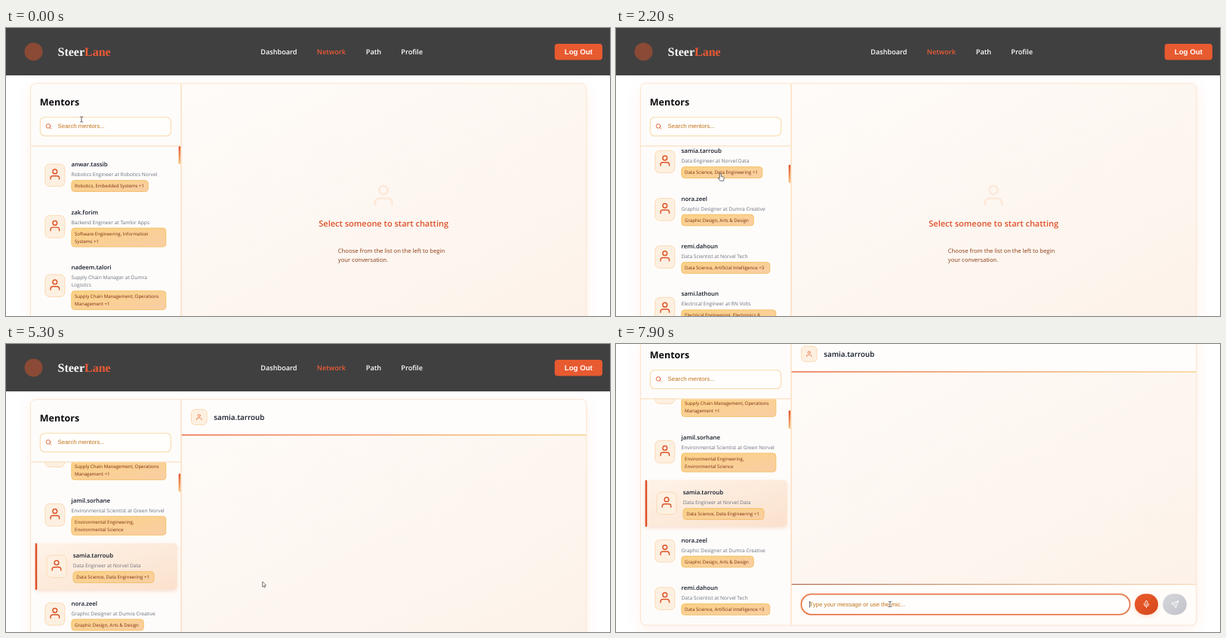
An HTML page for the animation above (8 s loop, 800 px wide and 383 px high).

```html
<!DOCTYPE html>
<html lang="en">
<head>
<meta charset="utf-8">
<title>Mentor chat</title>
<style>
html, body { margin: 0; width: 100%; height: 100%; overflow: hidden; background: #fff; }
svg { display: block; width: 100vw; height: 100vh; }
text { font-family: "Open Sans", "Noto Sans", sans-serif; text-rendering: geometricPrecision; white-space: pre; }
.nav { font-size: 9.15px; font-weight: 600; fill: #fff; }
.brand { font: bold 16px "Liberation Serif", serif; fill: #fff; }
.button { font: bold 9.65px "Liberation Sans", sans-serif; fill: #fff; }
.field { font: 7.88px "Liberation Sans", sans-serif; fill: #c0741c; }
.heading { font-size: 12.5px; font-weight: 700; fill: #0b0b0f; }
.name { font-size: 7.8px; font-weight: 600; fill: #111827; }
.role { font-size: 6.65px; fill: #6b7280; }
.tag { font-size: 6.12px; font-weight: 500; fill: #7c2d12; }
.prompt { font-size: 11px; font-weight: 600; fill: #de5028; }
.hint { font-size: 7.65px; font-weight: 500; fill: #8a3a14; }
.peer { font-size: 9.8px; font-weight: 600; fill: #111827; }
.line { fill: none; stroke-linecap: round; stroke-linejoin: round; }
</style>
</head>
<body>
<svg id="stage" viewBox="0 0 800 383" preserveAspectRatio="none"></svg>
<script>
const LOOP = 8000, OPEN_CHAT = 4650, FOCUS = 6600, PAGE_SCROLL = 84;
const EXTRA_LINE = 10.1, ROW_HEIGHT = 61.6, ROW_PITCH = 63.4;
const ACTIVE = 4;

// name, role lines, tag lines, tag width
const mentors = [
  ["anwar.tassib", ["Robotics Engineer at Robotics Norvel"], ["Robotics, Embedded Systems +1"], 101.5],
  ["zak.forim", ["Backend Engineer at Tamlor Apps"], ["Software Engineering, Information", "Systems +1"], 125],
  ["nadeem.talori", ["Supply Chain Manager at Dumra", "Logistics"], ["Supply Chain Management, Operations", "Management +1"], 125],
  ["jamil.sorhane", ["Environmental Scientist at Green Norvel"], ["Environmental Engineering,", "Environmental Science"], 125],
  ["samia.tarroub", ["Data Engineer at Norvel Data"], ["Data Science, Data Engineering +1"], 107],
  ["nora.zeel", ["Graphic Designer at Dumra Creative"], ["Graphic Design, Arts & Design"], 95.5],
  ["remi.dahoun", ["Data Scientist at Norvel Tech"], ["Data Science, Artificial Intelligence +3"], 117],
  ["sami.lathoun", ["Electrical Engineer at RN Volts"], ["Electrical Engineering, Electronics &", "Communications +1"], 125]
];

const text = (cls, x, y, value, attrs = "") =>
  `<text class="${cls}" x="${x}" y="${y}" ${attrs}>${value.replace(/&/g, "&amp;")}</text>`;

const box = (x, y, w, h, r, fill, stroke = "none", width = 1) =>
  `<rect x="${x}" y="${y}" width="${w}" height="${h}" rx="${r}" fill="${fill}" stroke="${stroke}" stroke-width="${width}"/>`;

const gradient = (id, from, to, dir = 'x2="1" y2="1"') =>
  `<linearGradient id="${id}" x1="0" y1="0" ${dir}><stop stop-color="${from}"/><stop offset="1" stop-color="${to}"/></linearGradient>`;

const person = (x, y, scale, color) =>
  `<g class="line" transform="translate(${x} ${y}) scale(${scale}) translate(-12 -12)" stroke="${color}" stroke-width="2">
    <circle cx="12" cy="7" r="4"/><path d="M20 21v-2a4 4 0 0 0-4-4H8a4 4 0 0 0-4 4v2"/></g>`;

function mentorRow([name, roles, tags, tagWidth], y, index) {
  const extra = (roles.length + tags.length - 2) * EXTRA_LINE;
  const height = ROW_HEIGHT + extra, middle = height / 2 - 16.5;
  const tagTop = 21.2 + (roles.length - 1) * EXTRA_LINE;
  const highlight = index === ACTIVE
    ? `<g id="highlight"><g filter="url(#rowShadow)">${box(38.7, -16.5, 188, height + .4, 5, "url(#activeRow)")}</g>
       ${box(38.7, -16.5, 2.5, height + .4, 1, "#dd5028")}</g>` : "";
  return `<g transform="translate(0 ${y})">${highlight}<g ${index === ACTIVE ? 'id="activeText"' : ""}>
    ${box(51.8, middle - 14.8, 26, 29.6, 6, "#fdf0e1", "#fbd9b5")}
    ${person(64.8, middle - 1.3, .72, "#de5328")}
    ${text("name", 86.5, 2.6, name)}
    ${roles.map((line, i) => text("role", 86.5, 15.8 + i * EXTRA_LINE, line)).join("")}
    ${box(86.8, tagTop, tagWidth, 14.8 + (tags.length - 1) * EXTRA_LINE, 4, "url(#tagFill)", "#f4bf62", .9)}
    ${tags.map((line, i) => text("tag", 91, tagTop + 9.6 + i * EXTRA_LINE, line)).join("")}
  </g></g>`;
}

function mentorList() {
  let y = 181.5;
  return mentors.map((mentor, i) => {
    const row = mentorRow(mentor, y, i);
    y += ROW_PITCH + (mentor[1].length + mentor[2].length - 2) * EXTRA_LINE;
    return row;
  }).join("");
}

const header = `
  <rect width="800" height="63" fill="#404041"/>
  <circle cx="36.5" cy="31.5" r="12" fill="#8a4a35"/>
  <text class="brand" x="68.5" y="36.7">Steer<tspan fill="#ee5a34">Lane</tspan></text>
  ${text("nav", 337.3, 35.2, "Dashboard")}
  ${text("nav", 411.8, 35.2, "Network", 'style="fill:#ee5a34"')}
  ${text("nav", 476.8, 35.2, "Path")}
  ${text("nav", 523.3, 35.2, "Profile")}
  ${box(726.7, 21, 63.2, 21.5, 4, "#e85a30")}
  ${text("button", 758.3, 34.8, "Log Out", 'text-anchor="middle"')}`;

const sidebar = `
  <rect x="33" y="74" width="198.5" height="384" fill="#fefcfa"/>
  <g clip-path="url(#listClip)"><g id="list">${mentorList()}</g>
    <rect id="thumb" x="228.6" width="3" height="24" rx="1" fill="url(#thumbFill)"/></g>
  <rect x="33" y="156.3" width="198.5" height="1.2" fill="#fbdfbd"/>
  <rect x="231.3" y="74" width="1.4" height="384" fill="#fbdcbc"/>
  ${text("heading", 44.8, 103, "Mentors")}
  ${box(45.3, 118.7, 173.2, 24.8, 6, "#fffefd", "#f8daa8", 1.1)}
  <g class="line" stroke="#df5a2c" stroke-width=".9"><circle cx="56" cy="130.4" r="2.8"/><path d="M58.1 132.5l1.7 1.7"/></g>
  ${text("field", 68.6, 133.3, "Search mentors...")}`;

const emptyPane = `<g id="emptyPane">
  ${person(500, 222.5, 1.4, "#fde9da")}
  ${text("prompt", 500.2, 263.9, "Select someone to start chatting", 'text-anchor="middle"')}
  ${text("hint", 439.8, 298.7, "Choose from the list on the left to begin")}
  ${text("hint", 439.8, 311.4, "your conversation.")}</g>`;

const chatPane = `<g id="chatPane">
  <rect x="232.7" y="74" width="536" height="47" fill="#fffdfb"/>
  <rect x="232.7" y="120.3" width="536" height="1.4" fill="url(#headLine)"/>
  ${box(245.5, 87, 20.5, 20.4, 5, "#fdf0e1", "#fbd9b5")}
  ${person(255.7, 97.2, .4, "#e8703f")}
  ${text("peer", 275.3, 101.2, mentors[ACTIVE][0])}
  <rect x="232.7" y="404" width="536" height="54" fill="#fffcf9"/>
  <rect x="232.7" y="403.1" width="536" height="1.1" fill="url(#footLine)"/>
  <rect id="glow" x="243.6" y="414.9" width="438.8" height="30.6" rx="15.3" fill="#f9d9c8"/>
  <rect id="input" x="245.5" y="416.8" width="435" height="26.8" rx="13.4" fill="#fffefc"/>
  ${text("field", 256.3, 432.8, "Type your message or use the mic...")}
  <rect id="caret" x="256.3" y="426" width=".8" height="8.5" fill="#333"/>
  <g filter="url(#rowShadow)">${box(687, 416.2, 31, 28, 14, "url(#micFill)")}</g>
  ${box(724.2, 416.2, 31.6, 28, 14, "url(#sendFill)")}
  <g class="line" stroke="#fff" stroke-width=".9">
    <rect x="701.1" y="425.6" width="2.8" height="5.4" rx="1.4"/>
    <path d="M699.4 429.4v.4a3.1 3.1 0 0 0 6.2 0v-.4M702.5 432.9v1.6"/>
    <path d="M744.6 425.7l-9 3.3 3.9 1.8 1.8 3.9zM744.6 425.7l-5.1 5.1"/>
  </g></g>`;

const cursors = `<g id="cursor" stroke-linejoin="round">
  <path id="beam" class="line" stroke="#444" stroke-width=".8" d="M-1.7-3.6q1.7 0 1.7.9v5.4q0 .9-1.7.9M1.7-3.6q-1.7 0-1.7.9m0 5.4q0 .9 1.7.9"/>
  <path id="hand" fill="#fff" stroke="#333" stroke-width=".7" d="M-1 1a1 1 0 0 1 2 0v3l3 .8q1 .4.8 1.5l-.7 3.5h-4.7l-2.6-3.5q.6-1.3 2.2.1z"/>
  <path id="arrow" fill="#fff" stroke="#444" stroke-width=".7" d="M0 0v7l1.6-1.4 1 2.3 1.1-.5-1-2.3h2.2z"/></g>`;

const stage = document.getElementById("stage");
stage.innerHTML = `<defs>
  ${gradient("cardFill", "#fffdfb", "#fcf1e8")}
  ${gradient("tagFill", "#fbd285", "#f9cea4")}
  ${gradient("activeRow", "#fef3e8", "#fbe1cd")}
  ${gradient("micFill", "#ea5a2c", "#d6481c")}
  ${gradient("sendFill", "#d6d7dc", "#c1c3ca")}
  ${gradient("thumbFill", "#e2522a", "#f8c47c", 'x2="0" y2="1"')}
  ${gradient("headLine", "#ea6138", "#f7d183", 'x2="1" y2="0"')}
  ${gradient("footLine", "#a8583a", "#f8d5b0", 'x2="1" y2="0"')}
  <filter id="cardShadow" x="-10%" y="-15%" width="120%" height="130%"><feDropShadow dx="0" dy="5" stdDeviation="9" flood-color="#e8602c" flood-opacity=".09"/></filter>
  <filter id="rowShadow" x="-30%" y="-40%" width="160%" height="190%"><feDropShadow dx="0" dy="2" stdDeviation="2.5" flood-color="#e0582a" flood-opacity=".18"/></filter>
  <clipPath id="listClip"><rect x="33" y="157" width="198.5" height="300.5"/></clipPath>
  <clipPath id="cardClip"><rect x="32.5" y="73.7" width="736.3" height="384.3" rx="7"/></clipPath>
</defs>
<rect width="800" height="383" fill="#fff"/>
<g id="page">
  <g filter="url(#cardShadow)">${box(32.5, 73.7, 736.3, 384.3, 7, "url(#cardFill)")}</g>
  <g clip-path="url(#cardClip)">${sidebar}${emptyPane}${chatPane}</g>
  ${box(32.5, 73.7, 736.3, 384.3, 7, "none", "#fce3cd")}
  ${header}
</g>${cursors}`;

const part = Object.fromEntries([...stage.querySelectorAll("[id]")].map(el => [el.id, el]));
const show = (id, visible) => part[id].setAttribute("visibility", visible ? "visible" : "hidden");
const move = (id, x, y) => part[id].setAttribute("transform", `translate(${x} ${y})`);
const clamp = v => Math.max(0, Math.min(1, v));
const ease = v => v * v * (3 - 2 * v);

// keys: [time, ...values], eased from each key to the next
function track(keys, t) {
  let i = 0;
  while (i < keys.length - 2 && t >= keys[i + 1][0]) i++;
  const [a, b] = [keys[i], keys[i + 1]];
  const k = ease(clamp((t - a[0]) / (b[0] - a[0])));
  return a.slice(1).map((v, n) => v + (b[n + 1] - v) * k);
}

const listKeys = [[0, 0], [550, 0], [1500, 312], [2450, 312], [2800, 275.3], [3000, 275.3], [3550, 194]];
const pageKeys = [[5450, 0], [5750, PAGE_SCROLL]];
const cursorKeys = [
  [0, 100, 121.5], [100, 100, 121.5], [600, 138, 193], [2800, 138.5, 193.5], [3500, 132, 212],
  [3800, 132, 212], [4350, 140, 294], [4750, 140, 294], [5250, 339.7, 316], [5900, 339.7, 316], [6450, 363, 346]
];

function cursorKind(x, y, pageY) {
  const py = y + pageY;
  const inSearch = x > 45 && x < 219 && py > 118 && py < 144;
  const inInput = pageY > 0 && x > 245 && x < 681 && py > 416 && py < 444;
  if (inSearch || inInput) return "beam";
  return x > 39 && x < 228 && py > 157 ? "hand" : "arrow";
}

function draw(t) {
  const [scroll] = track(listKeys, t), [pageY] = track(pageKeys, t), [x, y] = track(cursorKeys, t);
  const opened = t >= OPEN_CHAT, focused = t >= FOCUS;
  const select = ease(clamp((t - OPEN_CHAT) / 200));
  move("page", 0, -pageY);
  move("list", 0, -scroll);
  part.thumb.setAttribute("y", 157 + scroll * .08);
  part.highlight.setAttribute("opacity", select);
  move("activeText", 2.2 * select, 0);
  show("emptyPane", !opened);
  show("chatPane", opened);
  show("glow", focused);
  show("caret", focused && (t - FOCUS) % 1000 < 500);
  part.input.setAttribute("stroke", focused ? "#e2602f" : "#fbd9ae");
  part.input.setAttribute("stroke-width", focused ? 1.3 : 1.1);
  move("cursor", x, y);
  const kind = cursorKind(x, y, pageY);
  ["beam", "hand", "arrow"].forEach(id => show(id, id === kind));
}

const start = performance.now();
function tick() {
  draw((performance.now() - start) % LOOP);
  requestAnimationFrame(tick);
}
tick();
</script>
</body>
</html>
```
